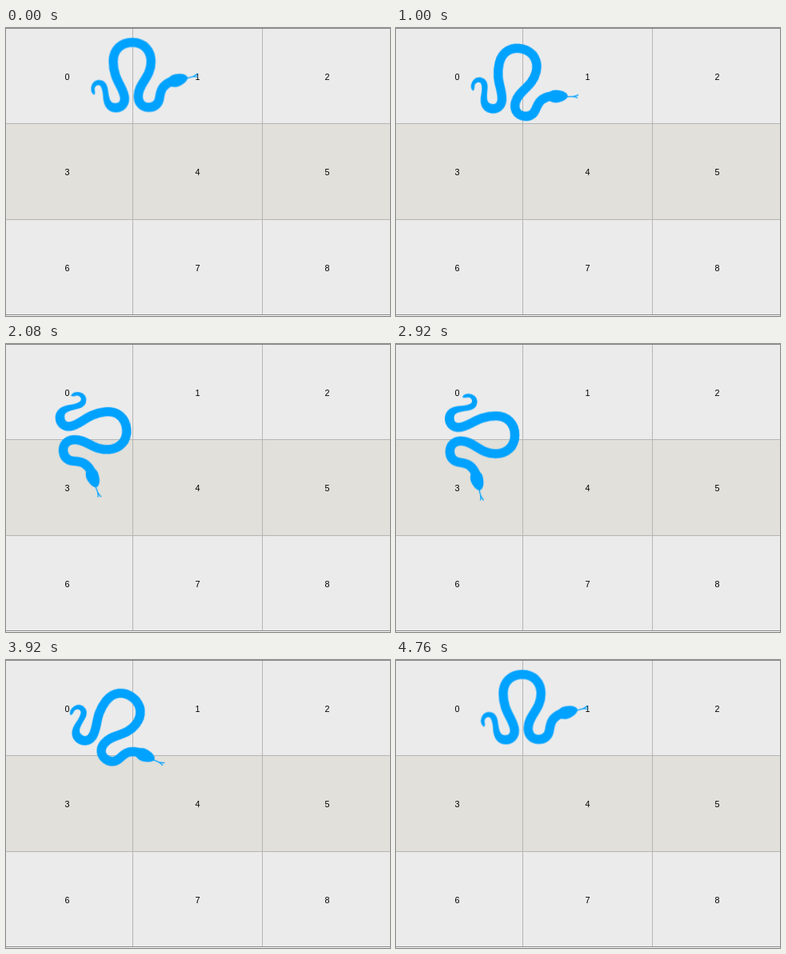
Recreate the animation shown at these times as an HTML page. Size 480 by 360 pixels, loop 4.8 s.

```html
<!DOCTYPE html>
<html lang="en">
<head>
<meta charset="utf-8">
<title>Snake on a grid</title>
<style>
  html, body { margin: 0; width: 100%; height: 100%; overflow: hidden; background: #fff; }
  svg { display: block; width: 480px; height: 360px; }
  .grid { shape-rendering: crispEdges; }
  text { font: 10.8px "Liberation Sans", Arial, sans-serif; text-anchor: middle; fill: #000; }
  .snake { animation: turn 4.8s ease-in-out infinite; }
  @keyframes turn {
    0%, 10%, 100% { transform: translate(173.5px, 59.5px) rotate(0deg); }
    50%, 60% { transform: translate(107px, 129.5px) rotate(90deg); }
  }
</style>
</head>
<body>
<svg viewBox="0 0 480 360">
  <g class="grid">
    <rect width="480" height="359" fill="#ebebeb"/>
    <rect y="120" width="480" height="119" fill="#e1e0da"/>
    <path d="M158.5 0V358M320.5 0V358M0 119.5H480M0 239.5H480" stroke="#b5b5b5"/>
    <path d="M0 .5H480M0 358.5H480" stroke="#868686"/>
  </g>
  <g id="labels"></g>
  <g class="snake">
    <g transform="translate(-173.5 -59.5)" fill="#00a2ff">
      <!-- tail -->
      <path d="M110 83.5C106 81 105.5 76 107 72C108.5 67.5 112 65 116.5 65C122 65 126 69 127 75
        C128 80 128 83 129.5 88C131 93 133.5 94 137.5 94V105.4C129 105.4 123.5 100 122 91
        C121 85 121.5 82 120 77C119 73 117.5 71.5 115.5 71.5C112.5 71.5 110.5 74 110.8 77
        C111 79 111.8 80.5 110.8 83Z"/>
      <!-- body -->
      <path fill="none" stroke="#00a2ff" stroke-width="11.4" d="M137 99.7C144 99.7 148.5 95 148.3 88
        C148 75 134 65 134 42C134 27 144 18 158 18C172 18 181.3 28 181.3 42C181.3 62 165.5 69 165.3 85
        C165 93 170 99.3 178 99.3C186 99.3 191 95 192 87C193.5 76 197 71 206 67"/>
      <!-- head -->
      <path d="M203 63C205 59.5 210 57.3 216 57.2C222 57 226.5 59 227 62C227.3 65 224 68.5 219 71.5
        C214 74.3 208 74.6 205 72Z"/>
      <!-- tongue -->
      <path fill="none" stroke="#00a2ff" stroke-width="1.3" d="M226 62.8L233 61Q236 60 239.5 57M232 61.2Q236 60.2 239.5 61"/>
    </g>
  </g>
</svg>
<script>
  const labels = document.getElementById("labels");
  const cols = [76.5, 239.5, 401.5], rows = [65, 184, 304];
  for (let i = 0; i < 9; i++) {
    const label = document.createElementNS("http://www.w3.org/2000/svg", "text");
    label.setAttribute("x", cols[i % 3]);
    label.setAttribute("y", rows[Math.floor(i / 3)]);
    label.textContent = i;
    labels.append(label);
  }
</script>
</body>
</html>
```
